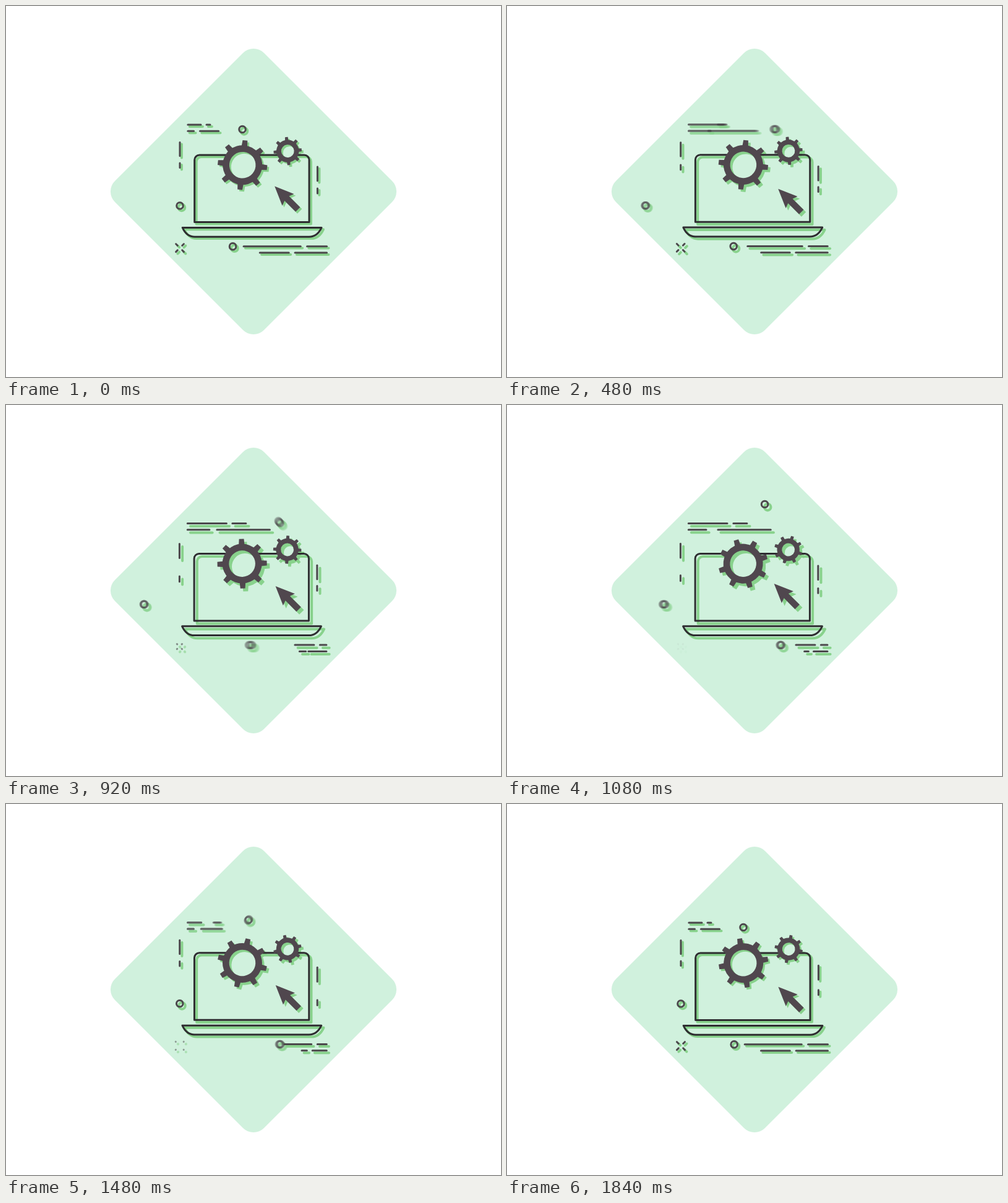
Recreate the animation shown at these times as an HTML page with a canvas. Size 800 by 600 pixels, loop 1.88 s.

```html
<!DOCTYPE html>
<html lang="en">
<head>
<meta charset="utf-8">
<title>Laptop and gears</title>
<style>
html, body { margin: 0; width: 100%; height: 100%; overflow: hidden; background: #fff; }
canvas { display: block; width: 800px; height: 600px; }
</style>
</head>
<body>
<canvas id="stage" width="800" height="600"></canvas>
<script>
const ctx = document.getElementById('stage').getContext('2d');
const STEP = 40, STEPS = 47, CYCLE = 48;
const LEAD = 8; // keeps step changes from lagging one display refresh
const TAU = Math.PI * 2;
const MINT = '#d0f1dd', GREEN = '#88d28c', INK = '#2e2d30', GREY = '#50474e', LINE = '#4b474b';

const mix = (a, b, p) => a + (b - a) * p;

// Cubic in-out between steps a and b.
function ease(f, a, b) {
  const u = Math.max(0, Math.min(1, (f - a) / (b - a)));
  return u ** 3 / (u ** 3 + (1 - u) ** 3);
}

// Out from a to b, back from c to d, wrapping past the end of the cycle.
function pulse(f, a, b, c, d) {
  const t = f < a ? f + CYCLE : f;
  return ease(t, a, b) - ease(t, c, d);
}

// Places of the three rings.
function triangleRing(f) {
  const l1 = ease(f, 2.5, 18.6), l2 = ease(f, 18.6, 29.5), l3 = ease(f, 25, 46);
  return [382 + 68.5 * l1 - 34.2 * l2 - 34.3 * l3, 199.5 - 39.5 * (l2 - l3)];
}
const sideRing = f => [281 - 64 * pulse(f, 0, 18, 16.4, 36.5), 323];
const lowRing = f => [366.5 + 86 * pulse(f, 15, 33, 31, 49), 388.9];

// Motion blur: overlay copies spread over half a step.
function smear(f, place, draw) {
  const [x1, y1] = place(f - .25), [x2, y2] = place(f + .25);
  if (Math.hypot(x2 - x1, y2 - y1) < 1.8) return draw(f);
  const n = 8;
  ctx.save();
  ctx.globalAlpha = 1.6 / n;
  for (let i = 0; i < n; i++) draw(f - .25 + .5 * i / (n - 1));
  ctx.restore();
}

function line(x1, y1, x2, y2) {
  ctx.beginPath();
  ctx.moveTo(x1, y1);
  ctx.lineTo(x2, y2);
  ctx.stroke();
}
function hDash(a, b, y) { line(a + 1.5, y, b - 1.5, y); }
function vDash(a, b, x) { line(x, a + 1.5, x, b - 1.5); }

function diamond() {
  const side = 340.8;
  ctx.save();
  ctx.translate(400, 300);
  ctx.rotate(Math.PI / 4);
  ctx.beginPath();
  ctx.roundRect(-side / 2, -side / 2, side, side, 24);
  ctx.fillStyle = MINT;
  ctx.fill();
  ctx.restore();
}

function laptop() {
  // The top edge is open where the gears sit.
  ctx.beginPath();
  ctx.moveTo(360, 241);
  ctx.arcTo(304.7, 241, 304.7, 349.5, 8);
  ctx.lineTo(304.7, 349.5);
  ctx.lineTo(490, 349.5);
  ctx.arcTo(490, 241, 468, 241, 8);
  ctx.lineTo(468, 241);
  ctx.moveTo(404, 241);
  ctx.lineTo(442, 241);
  ctx.stroke();

  ctx.beginPath();
  ctx.moveTo(285.2, 358.4);
  ctx.lineTo(510, 358.4);
  ctx.bezierCurveTo(506, 367, 499, 373.2, 490, 373.2);
  ctx.lineTo(305, 373.2);
  ctx.bezierCurveTo(296, 373.2, 289, 367, 285.2, 358.4);
  ctx.closePath();
  ctx.stroke();
}

function gear(x, y, body, hole, tip, tooth, degrees) {
  ctx.save();
  ctx.translate(x, y);
  ctx.rotate(degrees * Math.PI / 180);
  ctx.beginPath();
  ctx.arc(0, 0, body, 0, TAU);
  ctx.moveTo(hole, 0);
  ctx.arc(0, 0, hole, 0, TAU, true);
  ctx.fill();
  for (let i = 0; i < 8; i++) {
    ctx.beginPath();
    ctx.moveTo(-tooth * .6, 1.5 - body);
    ctx.lineTo(-tooth / 2, -tip);
    ctx.lineTo(tooth / 2, -tip);
    ctx.lineTo(tooth * .6, 1.5 - body);
    ctx.fill();
    ctx.rotate(TAU / 8);
  }
  ctx.restore();
}

function pointer(f) {
  const back = pulse(f, 7, 13, 15, 33) + pulse(f, 31, 42, 44.5, 51);
  const half = [[31.3, 12.3], [23.3, 16], [41.2, 33.8]];
  const mirrored = half.map(([x, y]) => [y, x]).reverse();
  ctx.save();
  ctx.translate(431.4 + 7.2 * back, 288.8 + 7.2 * back);
  ctx.beginPath();
  ctx.moveTo(0, 0);
  for (const [x, y] of [...half, ...mirrored]) ctx.lineTo(x, y);
  ctx.fill();
  ctx.restore();
}

function topDashes(f) {
  const slide = t => pulse(t, 0, 25.5, 25.5, 45.5);
  const stretch = t => pulse(t, 3, 18.6, 25, 42);
  smear(f, t => [58 * slide(t), 0], t => {
    hDash(292.4, mix(316.5, 358.5, pulse(t, 3.4, 17, 24, 40.6)), 192);
    hDash(mix(322.5, 365, slide(t)), mix(331.5, 390, slide(t)), 192);
  });
  smear(f, t => [83 * stretch(t), 0], t => {
    hDash(292.4, mix(305, 331, pulse(t, 4, 13.5, 22, 34)), 202.3);
    hDash(mix(312, 340, pulse(t, 0, 25, 25.5, 42)), mix(345, 428.5, stretch(t)), 202.3);
  });
}

function sideDashes(f) {
  const l = pulse(f, 6, 23, 21, 42);
  vDash(219 + 4.5 * l, 244 + 5.5 * l, 281);
  vDash(252.5 + 23.5 * l, 263 + 25 * l, 281);
  const r = pulse(f, 20, 39, 37, 53);
  vDash(258.2 + 4.8 * r, 283.7 + 5.3 * r, 503.4);
  vDash(291.5 + 24.2 * r, 302.3 + 25 * r, 503.4);
}

function lowDashes(f) {
  const a = pulse(f, 8, 22, 30, 48);
  hDash(mix(382.5, 466, a), mix(477.7, 500, a), 388.7);
  hDash(mix(485, 506.4, a), 520, 388.7);
  const b = pulse(f, 8, 30, 33, 48), c = pulse(f, 10, 32, 33, 48);
  hDash(mix(408.7, 480, b), mix(458.7, 489.5, b), 399);
  hDash(mix(465.5, 495.3, c), 520, 399);
}

// The four strokes shrink inwards and fade, then grow back from outside.
function spark(f) {
  const returning = f > 32;
  const far = returning ? 6.5 : mix(6.4, 4.1, ease(f, 8, 26));
  const near = returning ? mix(6.4, 3.7, ease(f, 35, 47)) : 3.7;
  ctx.save();
  ctx.globalAlpha = 1 - pulse(f, 16, 31, 33, 41);
  for (const sx of [-1, 1]) {
    for (const sy of [-1, 1]) {
      line(281 + sx * near, 391.2 + sy * near, 281 + sx * far, 391.2 + sy * far);
    }
  }
  ctx.restore();
}

function ring(f, place) {
  smear(f, place, t => {
    ctx.beginPath();
    ctx.arc(...place(t), 5.3, 0, TAU);
    ctx.stroke();
  });
}

function scene(f, shift, width, ink, grey, thin) {
  ctx.save();
  ctx.translate(shift, shift);
  ctx.lineWidth = width;
  ctx.lineCap = ctx.lineJoin = 'round';
  ctx.strokeStyle = ink;
  ctx.fillStyle = grey;
  laptop();
  gear(382.2, 257.2, 32, 21.3, 40, 7.8, 6 + 7.5 * f);
  gear(455.2, 234.6, 18.2, 10.4, 22.7, 4.6, -5 - 7.5 * f);
  pointer(f);
  ctx.strokeStyle = thin;
  topDashes(f);
  sideDashes(f);
  lowDashes(f);
  spark(f);
  for (const place of [triangleRing, sideRing, lowRing]) ring(f, place);
  ctx.restore();
}

function frame(now) {
  const f = Math.floor((now + LEAD) / STEP) % STEPS;
  const sway = (1 - Math.cos(TAU * f / CYCLE)) / 2;
  const lift = -.6 * sway;
  ctx.fillStyle = '#fff';
  ctx.fillRect(0, 0, 800, 600);
  diamond();
  scene(f, lift + 2.9 + 1.8 * sway, 4, GREEN, GREEN, GREEN);
  scene(f, lift, 3, INK, GREY, LINE);
}

function tick(now) {
  frame(now);
  requestAnimationFrame(tick);
}
frame(0);
requestAnimationFrame(tick);
</script>
</body>
</html>
```
